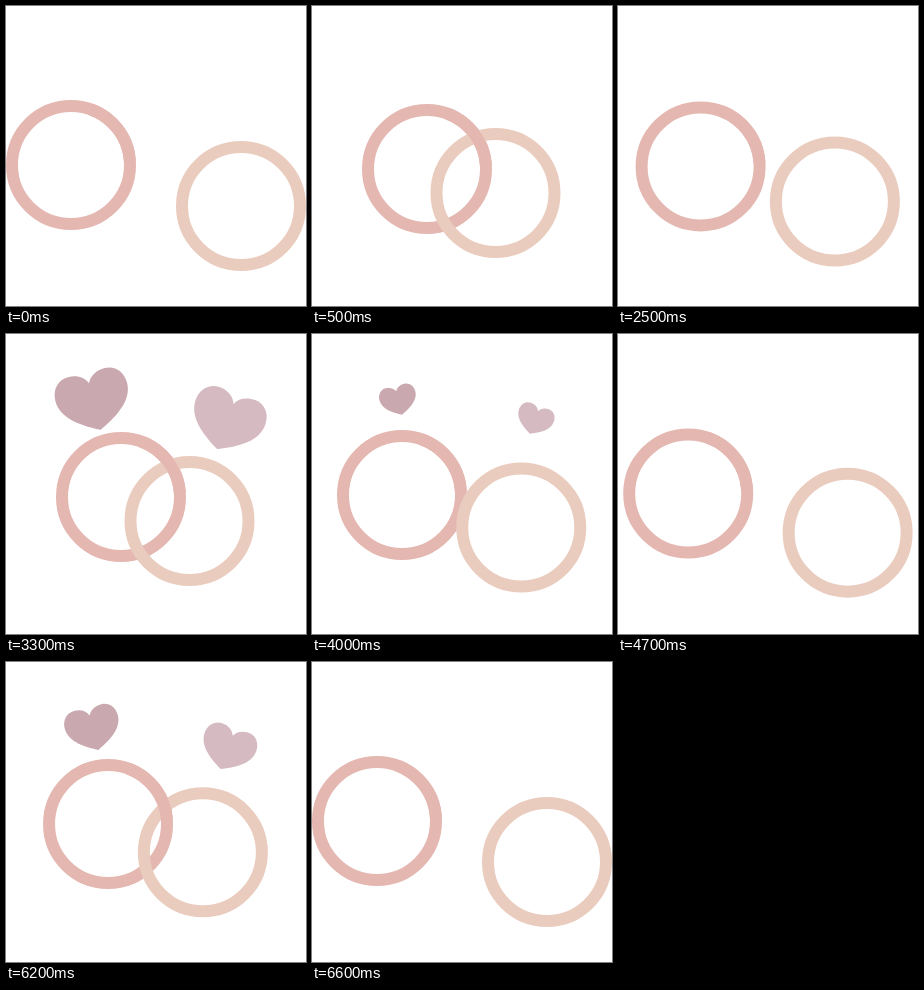
Write an HTML page that moves like this. It is 300x300 px and loops after 6.91 s.

```html
<!DOCTYPE html>
<html lang="en">
<head>
<meta charset="utf-8">
<title>Rings and hearts</title>
<style>
html, body { margin: 0; width: 100%; height: 100%; overflow: hidden; background: #fff; }
svg { display: block; width: 100vw; height: 100vh; }
circle, .front { fill: none; stroke-width: 12; }
.pink { stroke: #e4b7b1; }
.beige { stroke: #eaccbf; }
</style>
</head>
<body>
<svg viewBox="0 0 300 300">
  <defs>
    <path id="heart" d="M0 40C-14 33-37 21-37 1C-37-11-29-19-19-19C-10-19-3-15 0-8C3-15 10-19 19-19C29-19 37-11 37 1C37 21 14 33 0 40Z"/>
  </defs>
  <g id="heartL"><use href="#heart" fill="#c9a8af" transform="translate(-.5 -8.5) rotate(-14)"/></g>
  <g id="heartR"><use href="#heart" fill="#d5bac1" transform="translate(.3 -7.1) rotate(20)"/></g>
  <circle id="ringL" class="pink" r="59"/>
  <circle id="ringR" class="beige" r="59"/>
  <path id="arc" class="front pink"/>
</svg>
<script>
const LOOP = 6910, CYCLE = 2300, STEP = 100;
const $ = id => document.getElementById(id);
const clamp = x => Math.min(1, Math.max(0, x));
const smooth = x => { x = clamp(x); return x * x * (3 - 2 * x); };
const mix = (a, b, k) => a + (b - a) * k;
const place = (id, x, y, s = 1) =>
  $(id).setAttribute('transform', `translate(${x} ${y}) scale(${s})`);

// Part of the left ring that passes over the right one
const onRing = deg => {
  const a = deg * Math.PI / 180;
  return `${59 * Math.cos(a)} ${59 * Math.sin(a)}`;
};
$('arc').setAttribute('d', `M${onRing(-70)}A59 59 0 0 1 ${onRing(-4)}`);

function draw(ms) {
  const t = Math.floor((ms % LOOP) / STEP) * STEP % CYCLE;
  const out = 1 - smooth((t - 1400) / 600);
  const join = smooth(t / 500) * out;
  const grow = smooth((t - 500) / 500) * out;

  const x = mix(65, 115, join), y = mix(159, 163, join);
  place('ringL', x, y);
  place('arc', x, y);
  place('ringR', mix(235, 183.5, join), mix(200, 187, join));
  place('heartL', 85.5, 65.5, grow);
  place('heartR', 224.5, 84.5, grow);
}

const start = performance.now();
function tick(now) {
  draw(Math.max(0, now - start));
  requestAnimationFrame(tick);
}
draw(0);
requestAnimationFrame(tick);
</script>
</body>
</html>
```
